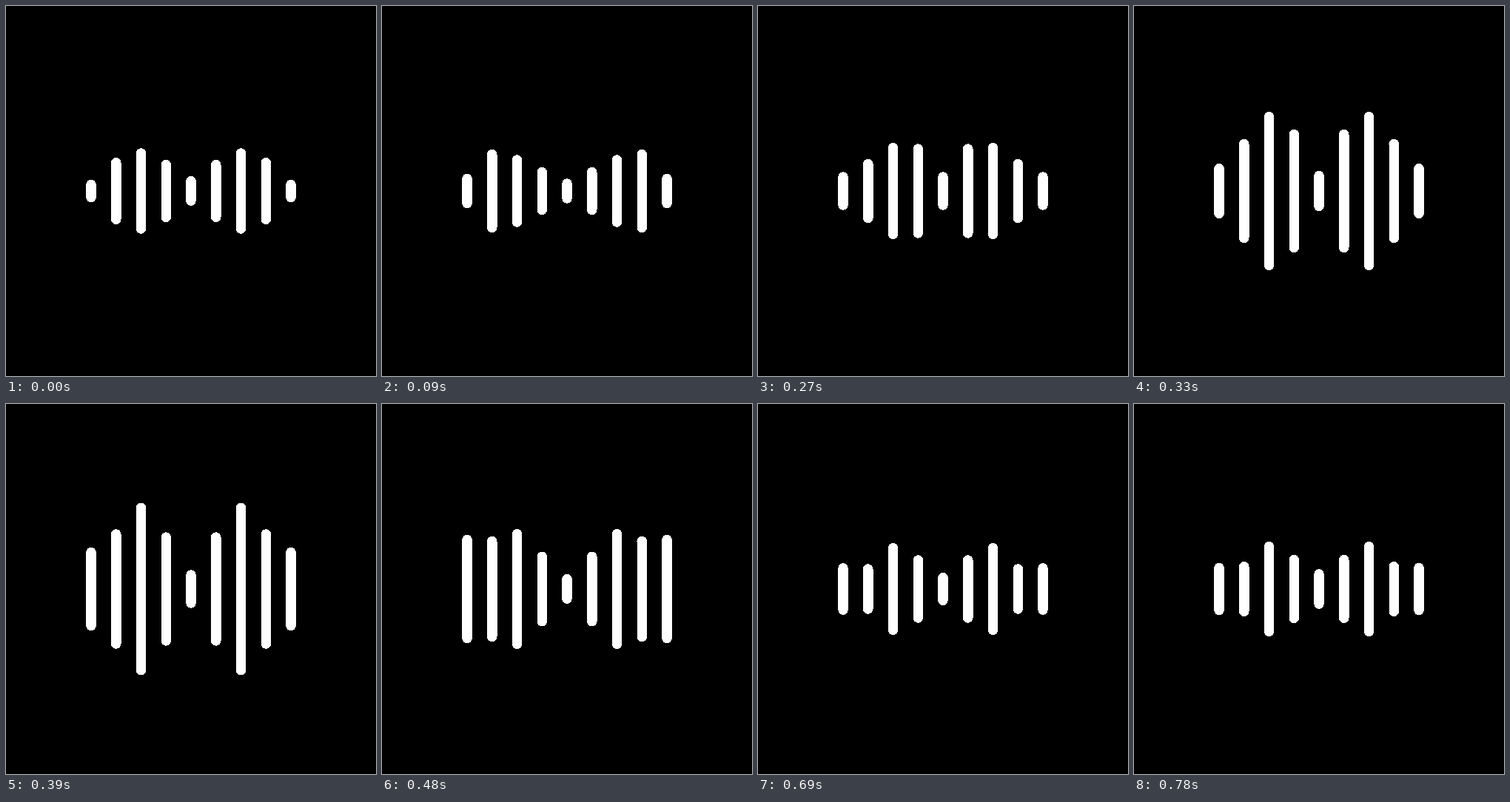
An HTML page that plays this animation: 500x500 px, repeating every 810 ms.

```html
<!DOCTYPE html>
<html lang="en">
<head>
<meta charset="utf-8">
<title>Sound bars</title>
<style>
  html, body { margin: 0; width: 100%; height: 100%; overflow: hidden; background: #000; }
  svg { display: block; width: 100%; height: 100%; }
</style>
</head>
<body>
<svg viewBox="0 0 500 500" fill="#fff" shape-rendering="crispEdges"></svg>
<script>
const LOOP = 810, STEP = 30;
const MID = 250, WIDTH = 13.5, GAP = WIDTH * 2.5;

// A soft swell of the given size, centred on a time in ms.
const swell = (t, size, at, spread) => size * Math.exp(-((t - at) ** 2) / (2 * spread ** 2));

// Half height of each bar, from the middle one outwards.
const middle = t => 22 - 5.3 * Math.cos(2 * Math.PI * (t - 90) / 480);
const inner = t => 43 + 0.004 * t + swell(t, -17.6, 147, 60) + swell(t, 40, 345, 68);
const tall = t => 58 + 0.008 * t + swell(t, -46.4, 190, 57) + swell(t, 57, 372, 74.5) + swell(t, -4, 600, 60);
const second = t => 40 - 0.004 * t + swell(t, 18, 80, 50) + swell(t, -30.6, 210, 50)
                  + swell(t, 43, 408, 109) + swell(t, -25.2, 600, 50);
const outer = t => 15 + 0.026 * t + swell(t, 6, 90, 40) + swell(t, 46.4, 468, 88);
const levels = [middle, inner, tall, second, outer];

const svg = document.querySelector('svg');
const bars = Array.from({ length: 9 }, (_, i) => {
  const bar = document.createElementNS('http://www.w3.org/2000/svg', 'rect');
  bar.setAttribute('x', MID + (i - 4) * GAP - WIDTH / 2);
  bar.setAttribute('width', WIDTH);
  bar.setAttribute('rx', WIDTH / 2);
  svg.append(bar);
  return { bar, level: levels[Math.abs(i - 4)] };
});

function draw(now) {
  const t = Math.floor(now % LOOP / STEP) * STEP;
  for (const { bar, level } of bars) {
    const half = level(t);
    bar.setAttribute('y', MID - half);
    bar.setAttribute('height', 2 * half);
  }
}

const start = performance.now();
function tick() {
  draw(performance.now() - start);
  requestAnimationFrame(tick);
}
tick();
</script>
</body>
</html>
```
